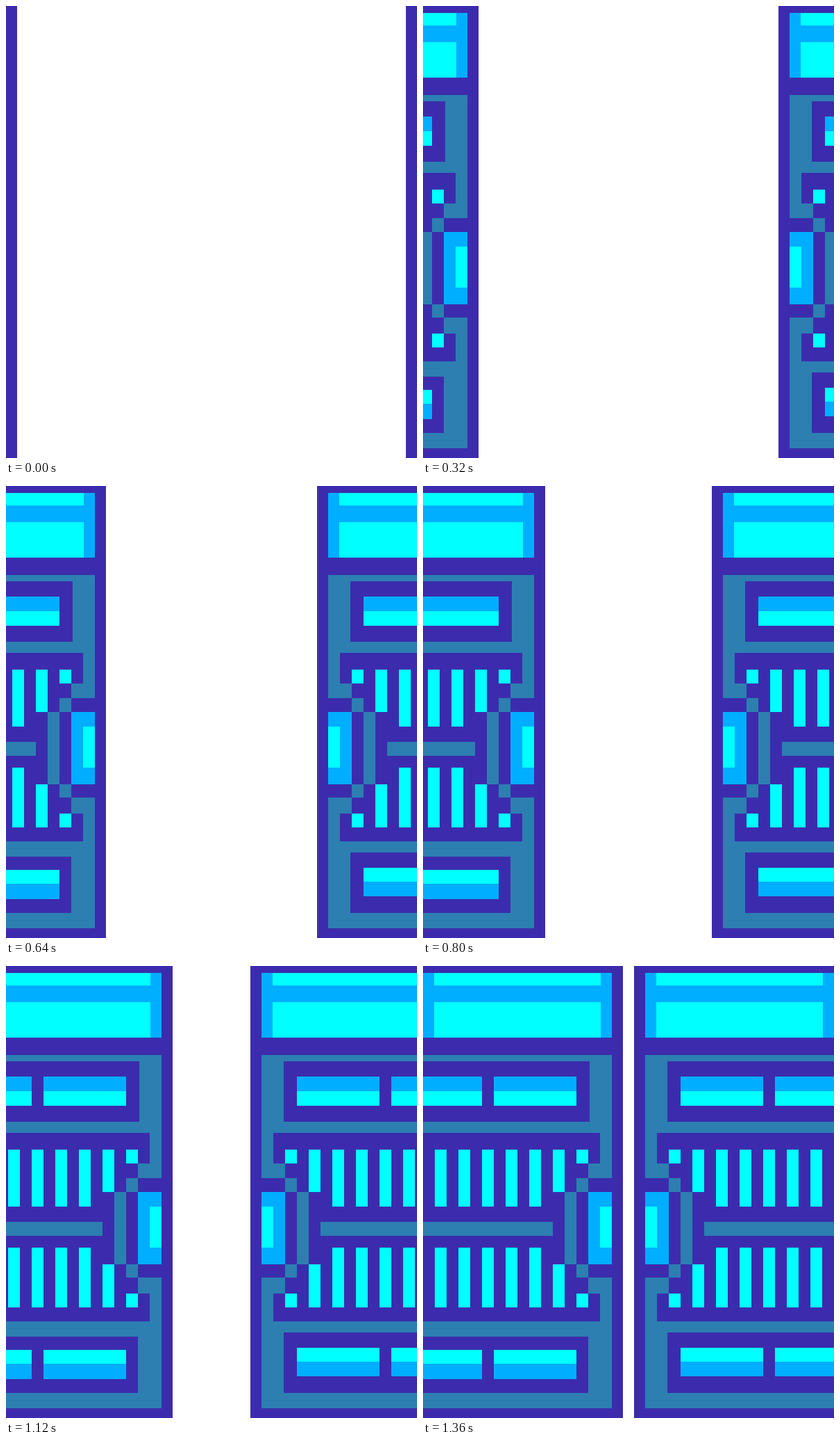
Recreate the animation shown at these times as an HTML page with a canvas. Size 592x650 px, loop 1.44 s.

```html
<!DOCTYPE html>
<html lang="en">
<head>
<meta charset="utf-8">
<title>Closing doors</title>
<style>
  html, body { margin: 0; width: 592px; height: 650px; overflow: hidden; background: #fff; }
  canvas { display: block; }
</style>
</head>
<body>
<canvas id="stage" width="592" height="650"></canvas>
<script>
const W = 592, H = 650, STEP_MS = 80, STEPS = 18, STEP_PX = 16, DOOR = 288;
const PURPLE = '#3c2cad', TEAL = '#2c7fb0', BLUE = '#00aeff', CYAN = '#00ffff';
const ctx = document.getElementById('stage').getContext('2d');

// Draws one door; x runs from the leading edge inwards.
function door(low) {
  const box = (color, x1, y1, x2, y2) => {
    ctx.fillStyle = color;
    ctx.fillRect(x1, y1, x2 - x1, y2 - y1);
  };
  const slots = (color, y1, y2) => {
    box(color, 67, y1, 186, y2);
    box(color, 203, y1, DOOR, y2);
  };

  box(PURPLE, 0, 0, DOOR, H);

  // Header
  box(BLUE, 16, 10, DOOR, 103);
  box(CYAN, 32, 10, 272, 28);
  box(CYAN, 32, 52, 272, 103);

  // Upper panel
  box(TEAL, 16, 128, DOOR, 240);
  box(PURPLE, 48, 137, DOOR, 224);
  slots(BLUE, 159, 180);
  slots(CYAN, 180, 201);

  // Notched frame around the grille
  box(TEAL, 16, 240, 33, 284);
  box(TEAL, 16, 284, 50, 305);
  box(TEAL, 50, 305, 67, 325);
  box(TEAL, 67, 325, 84, 429);
  box(TEAL, 50, 429, 67, 448);
  box(TEAL, 16, 448, 50, 471);
  box(TEAL, 16, 471, 33, 511);
  box(TEAL, 101, 368, DOOR, 388);

  // Handle
  box(BLUE, 16, 325, 50, 429);
  box(CYAN, 16, 346, 33, 405);

  // Grille bars
  for (let i = 0; i < 7; i++) {
    const x = 50 + i * 34;
    box(CYAN, x, 264, x + 17, [284, 325][i] || 346);
    box(CYAN, x, [471, 429][i] || 405, x + 17, 491);
  }

  // Lower panel
  box(TEAL, 16, 511, DOOR, 636);
  box(PURPLE, low.x, low.top, DOOR, 614);
  slots(CYAN, low.cyan, low.blue);
  slots(BLUE, low.blue, low.end);
}

const LEFT_LOW = { x: 50, top: 533, cyan: 552, blue: 572, end: 594 };
const RIGHT_LOW = { x: 48, top: 527, cyan: 549, blue: 569, end: 590 };

function draw(ms) {
  const step = Math.floor(ms / STEP_MS) % STEPS;
  const edge = STEP_PX * (step + 1);
  ctx.setTransform(1, 0, 0, 1, 0, 0);
  ctx.fillStyle = '#fff';
  ctx.fillRect(0, 0, W, H);
  ctx.setTransform(-1, 0, 0, 1, edge, 0);
  door(LEFT_LOW);
  ctx.setTransform(1, 0, 0, 1, W - edge, 0);
  door(RIGHT_LOW);
}

const start = performance.now();
function tick() {
  draw(performance.now() - start);
  requestAnimationFrame(tick);
}
tick();
</script>
</body>
</html>
```
